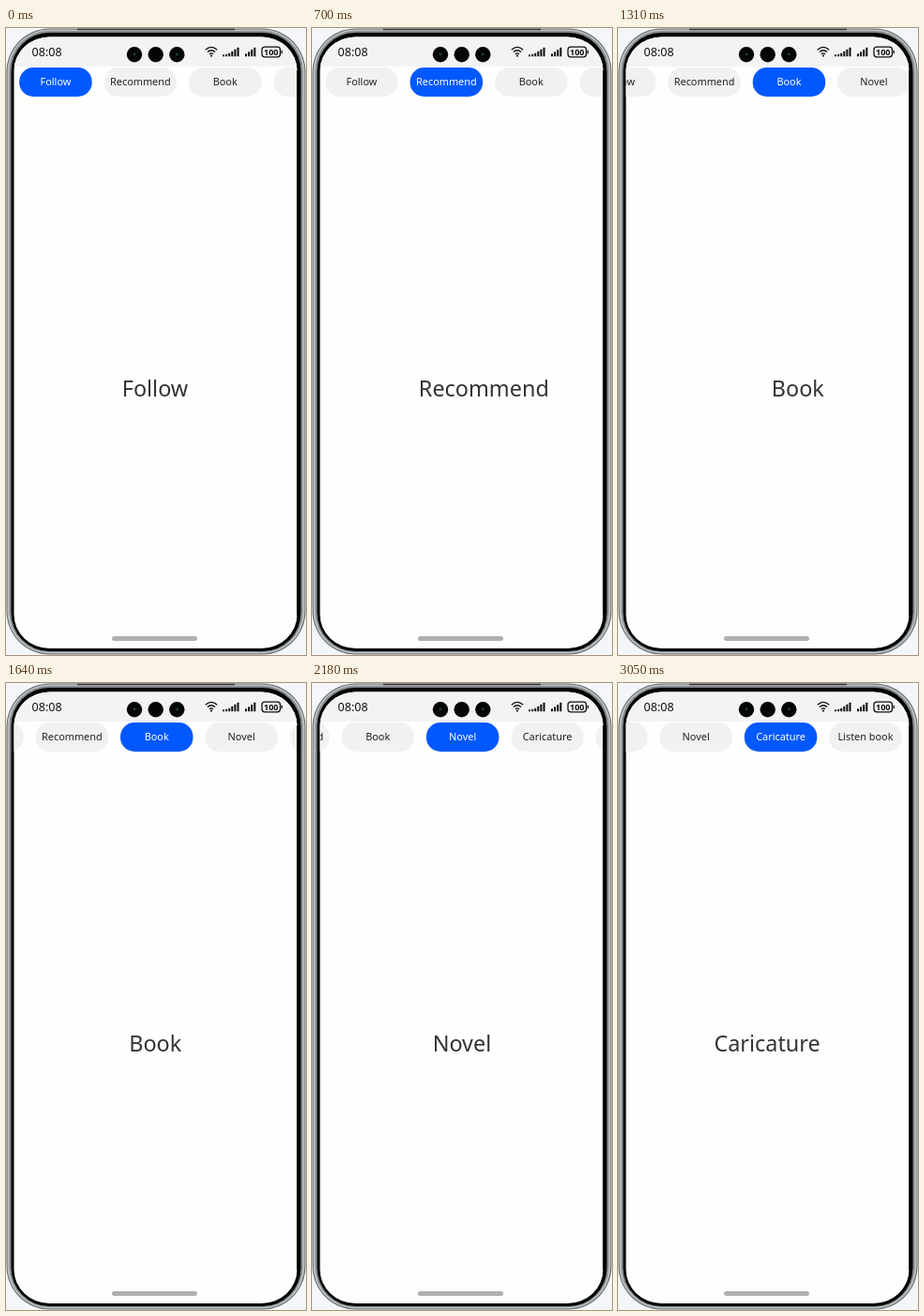
Recreate the animation shown at these times as an HTML page. Size 320 px wide and 667 px high, loop 3110 ms.

```html
<!DOCTYPE html>
<html lang="en">
<head>
<meta charset="utf-8">
<style>
html, body { margin: 0; width: 100%; height: 100%; overflow: hidden; background: #f5f6f9; }
svg { display: block; font-family: "Noto Sans", "Open Sans", sans-serif; }
</style>
</head>
<body>
<svg width="320" height="667" viewBox="0 0 320 667">
  <clipPath id="screen"><rect x="8.5" y="9.5" width="302" height="650.5" rx="38" ry="36"/></clipPath>

  <!-- phone body -->
  <rect x=".5" y=".5" width="319" height="666" rx="46" fill="#626769"/>
  <rect x="1.5" y="1.5" width="317" height="664" rx="45" fill="#bcc1c3"/>
  <rect x="3.5" y="3" width="313" height="661" rx="43" fill="#858a8c"/>
  <rect x="5.5" y="5" width="309" height="658" rx="41" fill="#000"/>
  <path d="M76 1.5H244" stroke="#333" stroke-width="1.5"/>

  <g clip-path="url(#screen)">
    <rect x="8" y="9" width="304" height="652" fill="#fefefe"/>
    <rect x="8" y="9" width="304" height="32" fill="#f1f3f5"/>
    <g id="tabs" font-size="10.9" text-anchor="middle"></g>
    <g id="pages" font-size="23.4" text-anchor="middle" fill="#333"></g>
  </g>
  <path d="M310.5 45V625" stroke="#0b2a14"/>

  <!-- status bar -->
  <text x="27.5" y="30" font-size="12.6" font-weight="500" fill="#111">08:08</text>
  <g id="cameras"></g>
  <g fill="none" stroke="#111" stroke-width="1.3">
    <path d="M212.8 23.2Q219 17.6 225.2 23.2M214.9 25.6Q219 22 223.1 25.6M216.9 27.8Q219 26 221.1 27.8"/>
    <rect x="273" y="20.2" width="19.5" height="10.6" rx="3"/>
    <path d="M294.2 23.8V27.2"/>
  </g>
  <circle cx="219" cy="29.6" r="1.1" fill="#111"/>
  <g id="signal" fill="#111"></g>
  <text x="282.8" y="28.8" font-size="9" font-weight="700" text-anchor="middle" fill="#111">100</text>

  <rect x="113" y="647" width="91" height="5" rx="2.5" fill="#b0b0b0"/>
</svg>
<script>
const LOOP = 3110, PAGE = 302, PITCH = 90.4, TAB_W = 77.5;
const names = ["Follow", "Recommend", "Book", "Novel", "Caricature", "Listen book"];
const stops = [0, 0, 73, 163.5, 241]; // tab bar scroll per page

// Finger drag from start to release covers a part of the page; a spring does the rest.
const swipes = [
  { start: 460, release: 510, drag: 0.37 },
  { start: 1050, release: 1145, drag: 0.4 },
  { start: 1640, release: 1750, drag: 0.023 },
  { start: 2250, release: 2459, drag: 0.115 }
];

const byId = id => document.getElementById(id);
const clamp = x => Math.min(1, Math.max(0, x));
const smooth = x => x * x * (3 - 2 * x);

function add(parent, tag, attrs, text = "") {
  const el = document.createElementNS("http://www.w3.org/2000/svg", tag);
  for (const key in attrs) el.setAttribute(key, attrs[key]);
  el.textContent = text;
  return parent.appendChild(el);
}

const tabs = names.map((name, i) => {
  const x = 14.2 + i * PITCH;
  return {
    pill: add(byId("tabs"), "rect", { x, y: 42, width: TAB_W, height: 31, rx: 15 }),
    label: add(byId("tabs"), "text", { x: x + TAB_W / 2, y: 61.3 }, name)
  };
});
names.slice(0, 5).forEach((name, i) =>
  add(byId("pages"), "text", { x: 159 + i * PAGE, y: 392 }, name));

for (const cx of [137, 159.7, 182.3]) {
  add(byId("cameras"), "circle", { cx, cy: 28.3, r: 8.2, fill: "#050505" });
  if (cx !== 159.7) add(byId("cameras"), "circle", { cx, cy: 27.8, r: 1.5, fill: "#1d4030" });
}

function bars(x, heights) {
  heights.forEach((h, i) =>
    add(byId("signal"), "rect", { x: x + i * 3.1, y: 30.3 - h, width: 2, height: h, rx: 0.5 }));
}
bars(231, [2, 2.5, 3.5, 5.5, 7.5, 9.5]);
bars(255, [3, 5, 7.3, 9.5]);

function progress({ start, release, drag }, t) {
  if (t < release) return drag * clamp((t - start) / (release - start)) ** 2;
  const s = (t - release) / 1000;
  return 1 - (1 - drag) * (1 + 16 * s) * Math.exp(-18.1 * s);
}

function draw(now) {
  const t = now % LOOP;
  let page = 0, scroll = 0, active = 0;
  swipes.forEach((swipe, i) => {
    page += progress(swipe, t);
    scroll += (stops[i + 1] - stops[i]) * smooth(clamp((t - swipe.release) / 260));
    if (t >= swipe.release) active = i + 1;
  });
  byId("pages").setAttribute("transform", `translate(${-page * PAGE})`);
  byId("tabs").setAttribute("transform", `translate(${-scroll})`);
  tabs.forEach(({ pill, label }, i) => {
    pill.setAttribute("fill", i === active ? "#0058ff" : "#f1f1f1");
    label.setAttribute("fill", i === active ? "#fff" : "#222");
  });
}

const began = performance.now();
function tick() {
  draw(performance.now() - began);
  requestAnimationFrame(tick);
}
tick();
</script>
</body>
</html>
```
